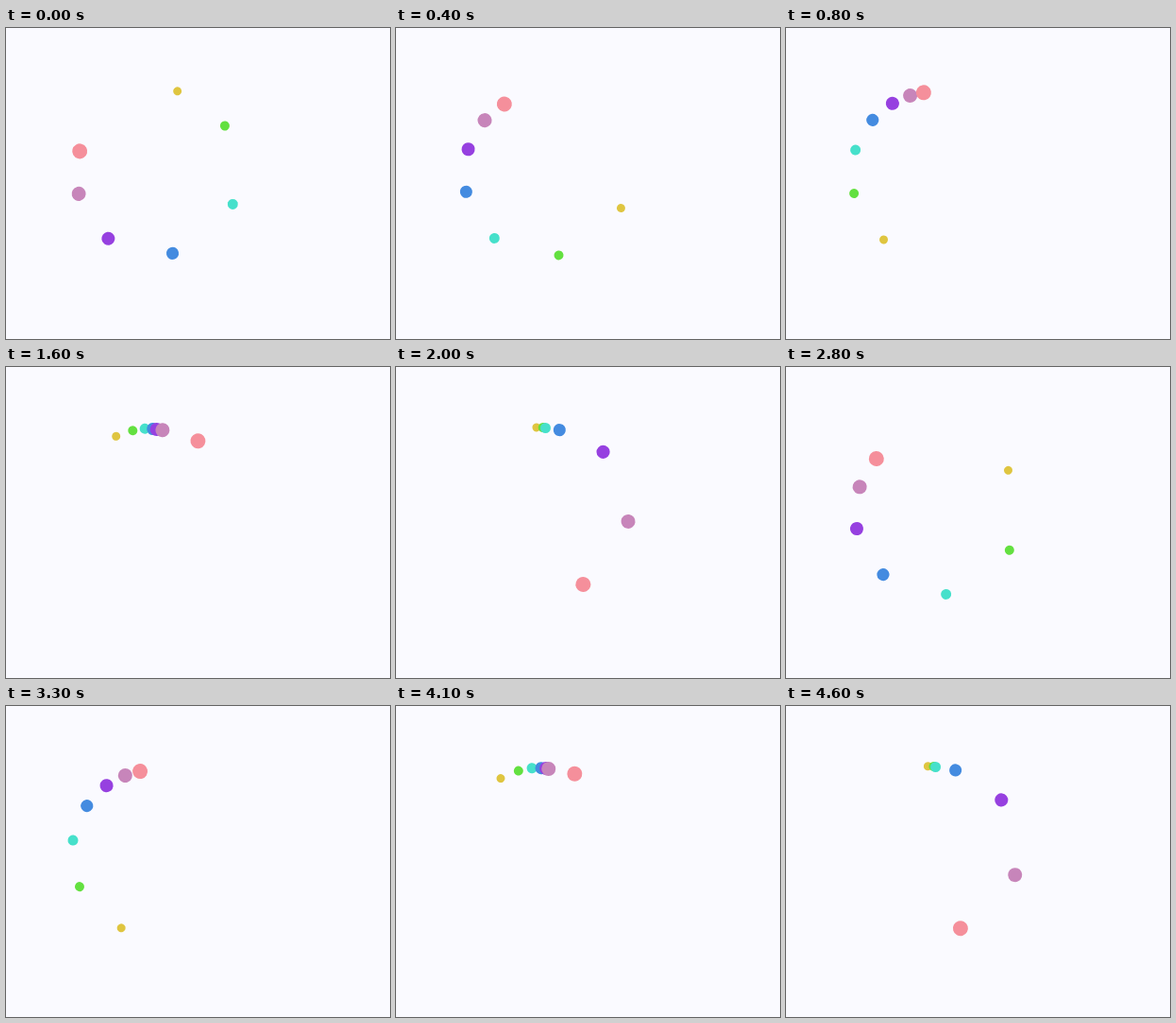
An HTML page for the animation above (4.7 s loop, 407 px wide and 329 px high).

```html
<!DOCTYPE html>
<html lang="en">
<head>
<meta charset="utf-8">
<title>Orbiting dots</title>
<style>
  html, body {
    margin: 0;
    width: 100%;
    height: 100%;
    overflow: hidden;
    background: #fafaff;
  }
  .dot {
    position: absolute;
    left: 152.8px;
    top: 59px;
    border-radius: 50%;
    transform-origin: 50% 93.8px;
  }
</style>
</head>
<body>
<script>
  const LOOP = 4700;
  const STEP = 100;
  const TURN = 14; // one orbit, counted in gaps between neighbouring dots
  const COLORS = ['#dfc540', '#63e040', '#46e0cb', '#448be0', '#9640e0', '#c785ba', '#f58f9b'];

  const dots = COLORS.map((color, i) => {
    const dot = document.createElement('div');
    const size = 9 + i * 7 / 6;
    dot.className = 'dot';
    dot.style.background = color;
    dot.style.width = dot.style.height = size + 'px';
    document.body.append(dot);
    return dot;
  });

  // Gaps travelled by the last dot: a steady pace with a fading sway
  function progress(time) {
    const sway = 0.25 * Math.exp(-time / 3000) * Math.cos(2 * Math.PI * time / 2400);
    return 0.9 + 0.00546 * time + sway;
  }

  // cubic-bezier(.24, 0, .26, 1)
  function ease(x) {
    let lo = 0, hi = 1;
    for (let n = 0; n < 30; n++) {
      const t = (lo + hi) / 2, u = 1 - t;
      if (3 * u * u * t * 0.24 + 3 * u * t * t * 0.26 + t * t * t < x) lo = t;
      else hi = t;
    }
    return lo * lo * (3 - 2 * lo);
  }

  function draw(time) {
    const p = progress(Math.floor(time / STEP) * STEP);
    dots.forEach((dot, i) => {
      const turn = ease((p + i) / TURN % 1);
      dot.style.transform = `rotate(${turn * 360}deg)`;
    });
  }

  const start = performance.now();
  function frame() {
    draw((performance.now() - start) % LOOP);
    requestAnimationFrame(frame);
  }
  frame();
</script>
</body>
</html>
```
